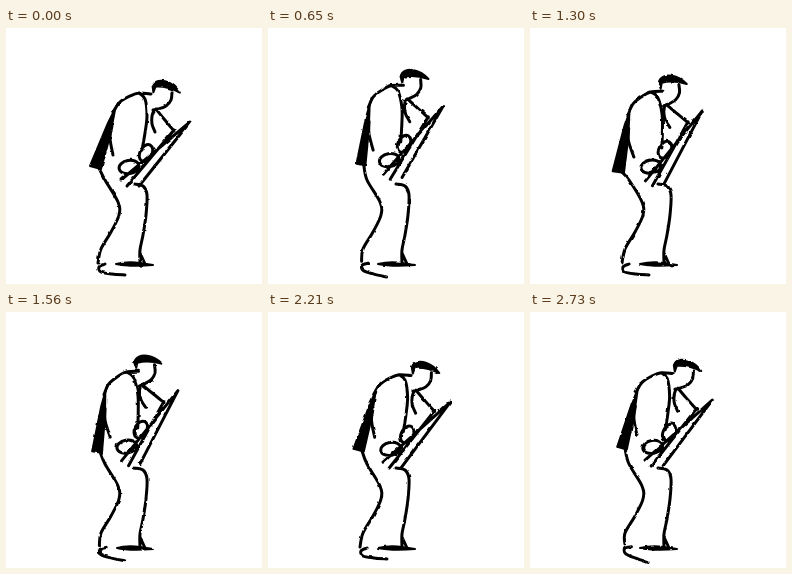
An HTML page for the animation above (2860 ms loop, 256 by 256 pixels).

```html
<!DOCTYPE html>
<html lang="en">
<head>
<meta charset="utf-8">
<title>Saxophone player</title>
<style>
  html, body { margin: 0; width: 100%; height: 100%; overflow: hidden; background: #fff; }
  svg { display: block; width: 100vw; height: 100vh; }
  path { stroke: #000; stroke-linecap: round; stroke-linejoin: round; }
  #lines { fill: none; stroke-width: 3; }
  #solid { fill: #000; stroke-width: 2; }
</style>
</head>
<body>
<svg viewBox="0 0 256 256">
  <filter id="ink" filterUnits="userSpaceOnUse" x="0" y="0" width="256" height="256"
      color-interpolation-filters="sRGB">
    <feTurbulence id="grain" type="fractalNoise" baseFrequency=".15" numOctaves="2"/>
    <feDisplacementMap in="SourceGraphic" scale="2.5" xChannelSelector="R" yChannelSelector="G"/>
  </filter>
  <g filter="url(#ink)">
    <path id="solid"/>
    <path id="lines"/>
  </g>
</svg>
<script>
const STEP = 130, COUNT = 22;

// Sway of the body: step, lean (radians), rise (px), heel lift 0..1
const SWAY = [
  [0, 0, 0, 0], [3, -.1, 3.5, 0], [4, -.19, 8, .5], [7, -.03, 2, .8], [8, -.07, 3, 1],
  [10, -.19, 0, 0], [14, -.2, 8, 1], [17, -.03, 2, 0], [18, .03, 0, 0],
  [21, -.03, 4, 1], [22, 0, 0, 0]
];

// The figure once, bent forward; every pose is made by turning and lifting it
const points = text => text.split(' ').map(p => p.split(',').map(Number));
const HIP = [120, 150], FOOT = [105, 245];
const torso = {
  shoulder: points('145,66 133,65 124,68 114,74 107,84'),
  hem: points('106,98 104,110 107,127'),
  arm: points('133,65 139,71 141,88 139,105 136,122'),
  coat: points('112,75 102,95 84,138 95,141 104,108 109,82')
};
const head = {
  face: points('166,64 165,72 160,78 152,81 147,82'),
  front: points('148,82 146,88 146,96 149,104'),
  pipe: points('150,81 158,91 168,103')
};
const sax = {
  bell: points('115,152 184,94 133,158'),
  rod: points('168,102 121,158')
};
const leg = points('99,152 112,174 113,187 105,204 95,221');
const heel = points('92,235 99,236 93,239 95,244 106,246 119,247');
const thigh = points('128,156 137,158 141,167 140,187 137,207 134,222 134,235');

const turn = ([x, y], [cx, cy], a) => [
  cx + (x - cx) * Math.cos(a) - (y - cy) * Math.sin(a),
  cy + (x - cx) * Math.sin(a) + (y - cy) * Math.cos(a)
];

const line = p => 'M' + p.map(q => q.join()).join('L');

// Smooth curve through all points
const curve = p => p.slice(1).reduce((d, c, i) => {
  const a = p[i - 1] || p[i], b = p[i], e = p[i + 2] || c;
  const near = [0, 1].map(k => b[k] + (c[k] - a[k]) / 6);
  const far = [0, 1].map(k => c[k] - (e[k] - b[k]) / 6);
  return `${d}C${near} ${far} ${c}`;
}, 'M' + p[0]);

function oval([x, y], rx, ry, degrees) {
  const [dx, dy] = turn([rx, 0], [0, 0], degrees * Math.PI / 180);
  const arc = `A${rx},${ry} ${degrees} 1 1 `;
  return `M${x - dx},${y - dy}${arc}${x + dx},${y + dy}${arc}${x - dx},${y - dy}`;
}

function cap([x, y], tilt) {
  const at = (u, v) => turn([x + u, y + v], [x, y], tilt) + ' ';
  return 'M' + at(0, -3) + 'C' + at(1, -9) + at(7, -11) + at(13, -10) +
    'C' + at(20, -9) + at(24, -6) + at(28, -2) +
    'Q' + at(14, -6) + at(3, -3) + 'L' + at(2, 3) + 'Z';
}

function swayAt(step) {
  const i = SWAY.findIndex(key => key[0] > step);
  const a = SWAY[i - 1], b = SWAY[i];
  const t = (step - a[0]) / (b[0] - a[0]), ease = (1 - Math.cos(Math.PI * t)) / 2;
  return a.slice(1).map((v, k) => v + (b[k + 1] - v) * ease);
}

function draw(step) {
  const [lean, rise, lift] = swayAt(step);
  // The coat tail is drawn in as the body rises
  const rig = amount => p => {
    const [x, y] = turn(p, HIP, lean * amount);
    return [x + rise * Math.max(0, (110 - p[0]) / 30), y - rise];
  };
  const whole = rig(1), trunk = rig(.75);
  const foot = heel.map(p => turn(p, FOOT, .25 * lift));
  const { coat, ...strokes } = torso;
  const curves = [
    ...Object.values(strokes).map(s => s.map(trunk)),
    ...Object.values(head).map(s => s.map(whole)),
    [trunk([93, 140]), ...leg, foot[0]], foot.slice(1), thigh
  ];
  return {
    solid: cap(whole([146, 61]), .2 + lean) + line(coat.map(trunk)) + 'Z' +
      'M110,236Q122,233 134,235L147,237Q124,239 110,236Z',
    lines: curves.map(curve).join('') +
      Object.values(sax).map(s => line(s.map(whole))).join('') +
      oval(whole([140, 125]), 9, 6, -62) + oval(whole([123, 139]), 10, 6.5, -10) +
      'M134,225L139,236'
  };
}

const [solid, lines, grain] = ['solid', 'lines', 'grain'].map(id => document.getElementById(id));
const start = performance.now();
let shown = -1;

function tick() {
  const step = Math.floor((performance.now() - start) / STEP) % COUNT;
  if (step !== shown) {
    const d = draw(step);
    solid.setAttribute('d', d.solid);
    lines.setAttribute('d', d.lines);
    grain.setAttribute('seed', step + 1);
    shown = step;
  }
  requestAnimationFrame(tick);
}
tick();
</script>
</body>
</html>
```
